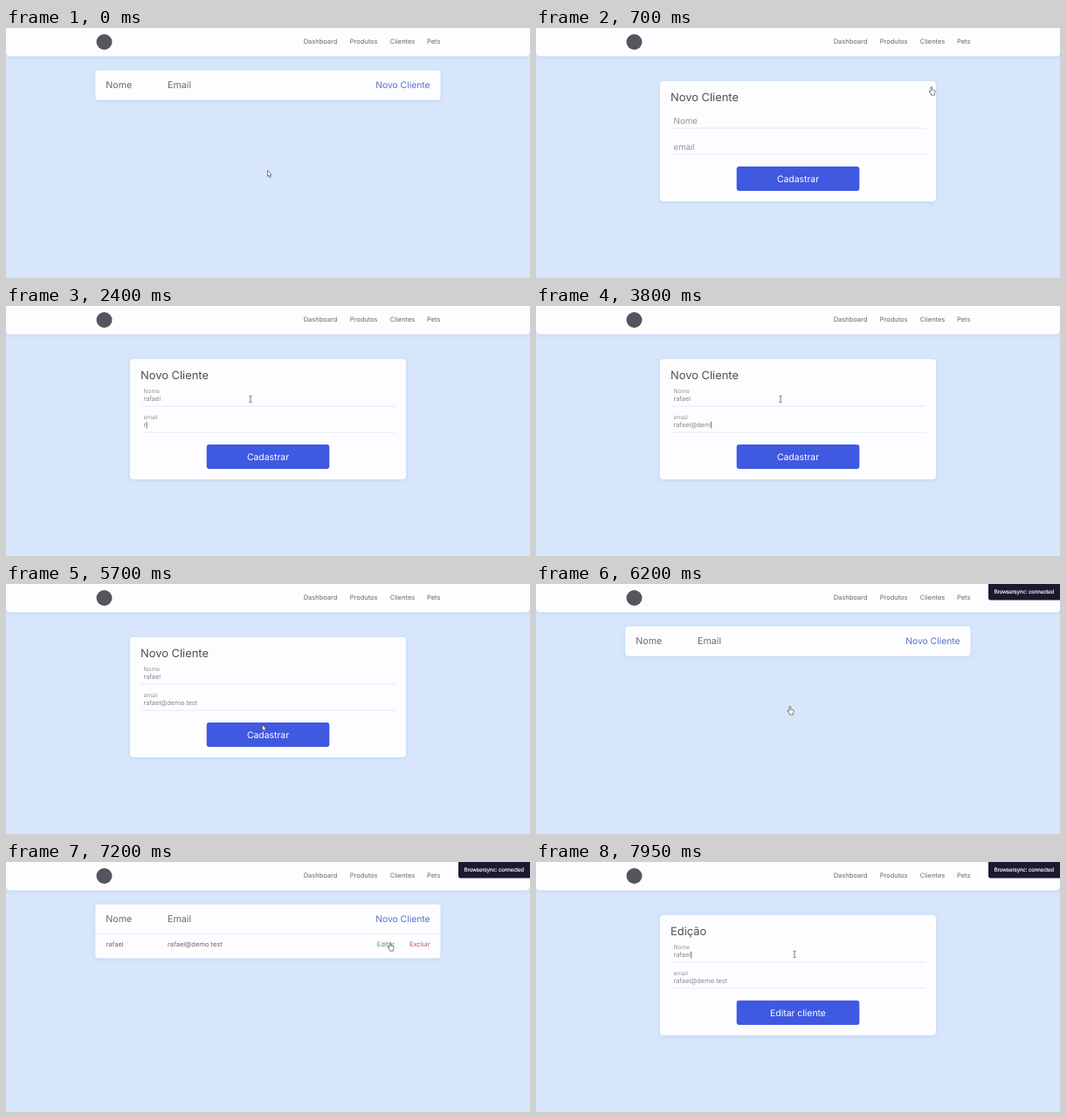
Write an HTML page that moves like this. It is 600x287 px and loops after 8000 ms.

```html
<!DOCTYPE html>
<html lang="pt">
<head>
<meta charset="utf-8">
<title>Clientes</title>
<style>
  html, body { margin: 0; width: 100%; height: 100%; overflow: hidden; background: #d7e6fa; }
  svg { display: block; width: 600px; height: 287px; }
  text { font-family: Inter, "Open Sans", sans-serif; font-size: 7.5px; fill: #69696e; text-rendering: geometricPrecision; white-space: pre; }
  .card { fill: #fdfdff; filter: drop-shadow(0 1.8px 2px #bfd5f4); }
  .head { font-size: 10.7px; }
  .new { font-size: 10.3px; fill: #5870cc; }
  .title { font-size: 12.9px; fill: #4f4f54; }
  .value { font-weight: 300; fill: #6a6a70; }
  .label { font-weight: 300; fill: #77777d; }
  .edit { fill: #4ea356; }
  .drop { fill: #c0496a; }
  .button { fill: #4059e1; }
  .caption { font-size: 10.4px; fill: #fff; text-anchor: middle; }
  .line { stroke: #e0ebf9; stroke-width: 1; }
  .notice { font: 6.3px "Liberation Sans", Arial, sans-serif; fill: #fff; stroke: #fff; stroke-width: .15; }
  .pointer { fill: #fff; stroke: #4a4a50; stroke-width: .7; stroke-linejoin: round; }
  .beam { fill: none; stroke: #55555a; stroke-width: .8; }
</style>
</head>
<body>
<svg viewBox="0 0 600 287">
  <rect width="600" height="287" fill="#d7e6fa"/>

  <path class="card" d="M0 -6H600V28a4.5 4.5 0 0 1-4.5 4.5H4.5A4.5 4.5 0 0 1 0 28Z"/>
  <circle cx="112.5" cy="16" r="9" fill="#55555f"/>
  <g id="nav"></g>

  <g id="list">
    <rect id="listCard" class="card" x="102.3" y="48.5" width="395.2" height="34.3" rx="4"/>
    <text class="head" x="114.3" y="68.9">Nome</text>
    <text class="head" x="185" y="68.9">Email</text>
    <text class="new" x="485.5" y="68.9" text-anchor="end">Novo Cliente</text>
    <g id="row">
      <path class="line" d="M102.3 82.6H497.5"/>
      <text id="rowName" x="114.5" y="96.8"></text>
      <text id="rowEmail" x="185" y="96.8"></text>
      <text class="edit" x="424.7" y="96.8">Editar</text>
      <text class="drop" x="485.5" y="96.8" text-anchor="end">Excluir</text>
    </g>
  </g>

  <g id="form">
    <rect class="card" x="142" y="61" width="316" height="138" rx="4"/>
    <text id="title" class="title" x="154" y="83.7"></text>
    <path class="line" d="M154.5 115H446M154.5 145H446"/>
    <text id="nameLabel" class="label" x="157.5">Nome</text>
    <text id="nameValue" class="value" x="157.5" y="109.3"></text>
    <text id="emailLabel" class="label" x="157.5">email</text>
    <text id="emailValue" class="value" x="157.5" y="139.2"></text>
    <rect id="caret" width=".8" height="8" fill="#55555a"/>
    <rect class="button" x="229.7" y="159" width="140.6" height="28" rx="3"/>
    <text id="caption" class="caption" x="300" y="176.7"></text>
  </g>

  <g id="notice">
    <path d="M518 0H600V18.5H520.5a2.5 2.5 0 0 1-2.5-2.5Z" fill="#1b1930"/>
    <text class="notice" x="524.5" y="11.2">Browsersync: connected</text>
  </g>

  <g id="mouse">
    <path id="arrow" class="pointer" d="M.5 .4V7.5L2 6.1L3.1 8.6L4.3 8.1L3.2 5.7H5.2Z"/>
    <path id="hand" class="pointer" d="M0 1.2a.8.8 0 0 1 1.6 0V4L4.2 4.5Q5.2 4.9 5.1 6L4.4 8.6V10.1H.4V9L-1.9 6Q-2 5.1-1.1 5.2L0 6.1Z"/>
    <path id="beam" class="beam" d="M-1.6-3.6H-.5L0-3.2L.5-3.6H1.6M0-3.2V3.2M-1.6 3.6H-.5L0 3.2L.5 3.6H1.6"/>
  </g>
</svg>
<script>
const LOOP = 8000, STEP = 50;
const NAME = 'rafael', EMAIL = 'rafael@demo.test';
const $ = id => document.getElementById(id);

const nameKeys = [1450, 1550, 1650, 1750, 1850, 1950];
const emailKeys = [2400, 2550, 2650, 2750, 2850, 2950, 3250, 3600, 3650,
  3800, 3900, 3950, 4050, 4150, 4250, 4400];

// time, x, y, pointer shape from that time on
const path = [
  [0, 299, 163, 'arrow'], [250, 299, 163, 'arrow'], [600, 452, 67, 'hand'],
  [750, 452, 67, 'arrow'], [1050, 280, 107, 'beam'], [4650, 280, 107, 'beam'],
  [4800, 291, 124, 'arrow'], [4950, 291, 124, 'arrow'], [5200, 310, 183, 'arrow'],
  [5400, 293, 161, 'arrow'], [5700, 293, 161, 'arrow'], [6050, 290, 140, 'hand'],
  [6250, 290, 140, 'hand'], [6450, 291, 132, 'hand'], [7000, 439, 92, 'hand'],
  [7450, 439, 92, 'arrow'], [7850, 296, 106, 'beam'], [LOOP, 296, 106, 'beam']
];

// start, end
const formShown = [[700, 5950], [7400, LOOP]];
const noticeShown = [[850, 1850], [6150, 7350], [7650, LOOP]];
const nameFocus = [[1150, 2100], [7950, LOOP]];
const emailFocus = [[2100, 4700], [5000, 5350]];

const within = (spans, t) => spans.some(([a, b]) => t >= a && t < b);
const clamp = v => Math.max(0, Math.min(1, v));
const mix = (a, b, p) => a + (b - a) * p;
const ease = p => p * p * (3 - 2 * p);
const show = (id, on) => $(id).style.display = on ? '' : 'none';
const typed = (text, keys, t) => text.slice(0, keys.filter(k => k <= t).length);

[['Dashboard', 340.7], ['Produtos', 393.7], ['Clientes', 439.7], ['Pets', 482]].forEach(([word, x]) => {
  const item = document.createElementNS('http://www.w3.org/2000/svg', 'text');
  item.setAttribute('x', x);
  item.setAttribute('y', 18.2);
  item.textContent = word;
  $('nav').append(item);
});
$('rowName').textContent = NAME;
$('rowEmail').textContent = EMAIL;

function floatLabel(id, restY, p) {
  $(id).setAttribute('y', mix(restY, restY - 10, p));
  $(id).style.fontSize = mix(9.8, 6.6, p) + 'px';
}

function placeCaret(t) {
  const field = within(nameFocus, t) ? 'nameValue' : within(emailFocus, t) ? 'emailValue' : null;
  show('caret', field);
  if (!field) return;
  const value = $(field);
  const width = value.textContent ? value.getComputedTextLength() + .5 : 0;
  $('caret').setAttribute('x', 157.5 + width);
  $('caret').setAttribute('y', value.getAttribute('y') - 6.6);
}

function movePointer(t) {
  const i = path.findIndex((key, n) => t >= key[0] && t < path[n + 1][0]);
  const [t0, x0, y0, shape] = path[i], [t1, x1, y1] = path[i + 1];
  const p = ease((t - t0) / (t1 - t0));
  $('mouse').setAttribute('transform', `translate(${mix(x0, x1, p)} ${mix(y0, y1, p)})`);
  ['arrow', 'hand', 'beam'].forEach(s => show(s, s === shape));
}

function render(t) {
  const onForm = within(formShown, t), editing = t >= 7400;
  const hasRow = t >= 6300;
  show('form', onForm);
  show('list', !onForm);
  show('row', hasRow);
  $('listCard').setAttribute('height', hasRow ? 62 : 34.3);
  show('notice', within(noticeShown, t));

  $('title').textContent = editing ? 'Edição' : 'Novo Cliente';
  $('caption').textContent = editing ? 'Editar cliente' : 'Cadastrar';
  $('nameValue').textContent = typed(NAME, nameKeys, t);
  $('emailValue').textContent = typed(EMAIL, emailKeys, t);
  floatLabel('nameLabel', 109.6, clamp((t - 1100) / 150));
  floatLabel('emailLabel', 139.5, clamp((t - 2100) / 200));
  placeCaret(t);
  movePointer(t);
}

const start = performance.now();
function tick() {
  const t = (performance.now() - start) % LOOP;
  render(Math.floor(t / STEP) * STEP);
  requestAnimationFrame(tick);
}
tick();
</script>
</body>
</html>
```
